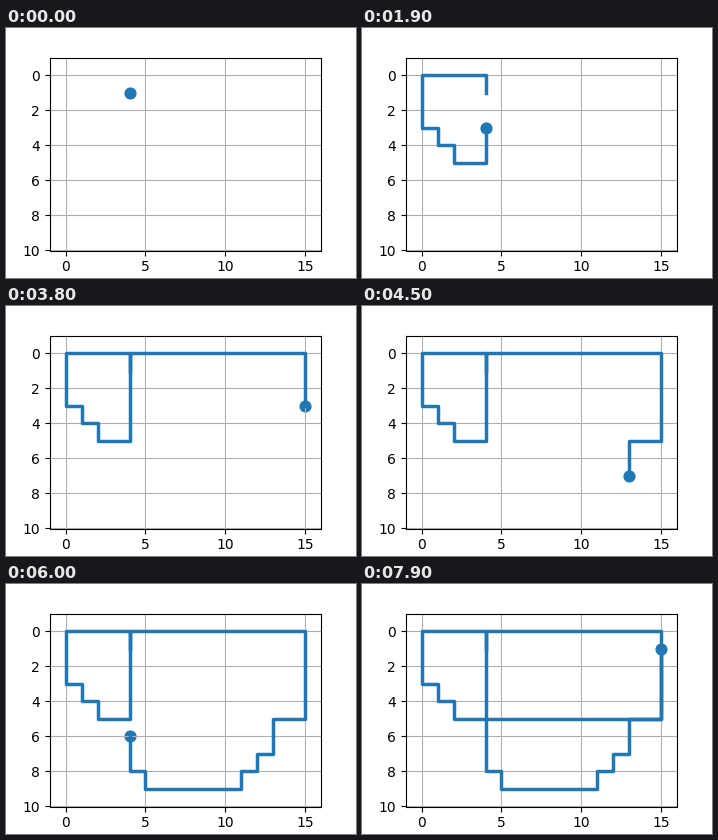
These frames come from a looping animation (350x250 px, 8 s). A matplotlib script:

```python
import numpy as np
import matplotlib.pyplot as plt
from matplotlib.animation import FuncAnimation

TICKS = 80
INTERVAL = 100
RESTS = (1, 2, 16, 22, 28, 42, 51, 61, 67, 72)  # ticks without a move

START = (4, 1)
HEADING = {"U": (0, -1), "D": (0, 1), "L": (-1, 0), "R": (1, 0)}
MOVES = ("U" + "L" * 4 + "D" * 3 + "RD" * 2 + "RR" + "U" * 5    # left loop
         + "R" * 11 + "D" * 5 + "LLDD" + "LD" * 2               # right side
         + "L" * 6 + "UL" + "UUU" + "R" * 11 + "U" * 4)         # bottom loop

route = np.cumsum([START] + [HEADING[m] for m in MOVES], axis=0)

fig, ax = plt.subplots(figsize=(3.5, 2.5), dpi=100)
ax.set_xlim(-1, 16)
ax.set_ylim(10, -1)
ax.set_xticks(range(0, 16, 5))
ax.set_yticks(range(0, 11, 2))
ax.grid(True)

trail, = ax.plot([], [], color="C0", lw=2.5)
dot = ax.scatter(*START, s=60, color="C0")


def update(tick):
    step = tick - sum(rest <= tick for rest in RESTS)
    trail.set_data(*route[:step + 1].T)
    dot.set_offsets(route[step])
    return trail, dot


anim = FuncAnimation(fig, update, frames=TICKS, interval=INTERVAL,
                     init_func=lambda: update(0), repeat=True, repeat_delay=0)
plt.show()
```
